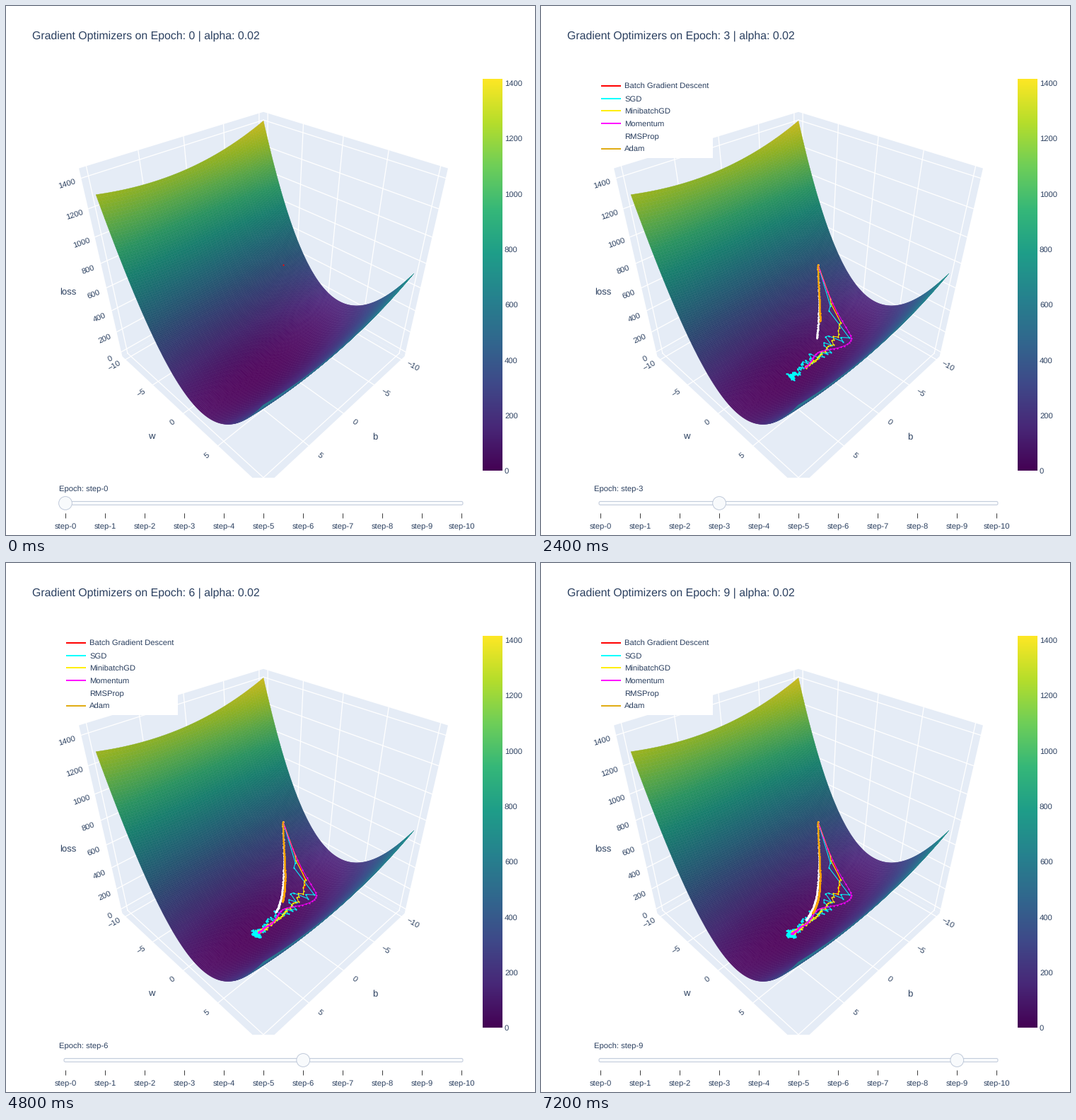
A matplotlib script for the animation above (8000 ms loop, 748 px wide and 748 px high).

```python
import numpy as np
import matplotlib.pyplot as plt
from matplotlib.animation import FuncAnimation
from matplotlib.collections import PolyCollection
from matplotlib.colors import LinearSegmentedColormap
from matplotlib.patches import Circle, FancyBboxPatch, Polygon, Rectangle

SIZE, DPI = 748, 100
PT = 72 / DPI
INK, WALL = "#2a3f5f", "#e5ecf6"
SMALL, LABEL, TITLE = 11.2, 13.1, 15.9
Z_MAX, EPOCHS, ALPHA = 1415, 10, 0.02
W_BEST, B_BEST = 2.02, 3.0
W_START, B_START = -4.0, -7.1
HALF, INSET = 0.5, 0.4694   # half extents of the unit box and of the data
plt.rcParams.update({"font.family": "Liberation Sans", "text.hinting": "none"})

fig = plt.figure(figsize=(SIZE / DPI, SIZE / DPI), dpi=DPI, facecolor="white")
ax = fig.add_axes([0, 0, 1, 1])
ax.axis("off")


def loss(w, b):
    return 8.62 * (w - W_BEST) ** 2 + (b - B_BEST) ** 2


def norm(v):
    return v * INSET / 10


def norm_z(z):
    return (2 * z / Z_MAX - 1) * INSET


def project(x, y, z):
    """Perspective view of the unit box from (1.25, 1.25, 1.25)."""
    x, y, z = np.broadcast_arrays(x, y, z)
    depth = 1.25 * 3 ** 0.5 - (x + y + z) / 3 ** 0.5
    f = 286.8 / np.tan(np.pi / 8) / depth
    return np.stack([364 + f * (y - x) / 2 ** 0.5,
                     380.2 - f * (2 * z - x - y) / 6 ** 0.5], axis=-1)


def on_surface(w, b):
    return project(norm(b), norm(w), norm_z(loss(w, b)))


def text(x, y, s, size=SMALL, **kw):
    return ax.text(x, y, s, fontsize=size * PT, color=INK, **kw)


def tilted(x, y, value, angle):
    text(x, y + 1.2, str(value).replace("-", "\u2212"), rotation=angle,
         ha="center", va="center")


# ---- box, grid and axis labels ----
scene_clip = Rectangle((0, 0), SIZE, 666.5, transform=ax.transData)


def wall(axis):
    """Back face of the box across the given axis."""
    corners = np.full((4, 3), -HALF)
    corners[1:3, (axis + 1) % 3] = HALF
    corners[2:4, (axis + 2) % 3] = HALF
    patch = Polygon(project(*corners.T), color=WALL, lw=0, zorder=1)
    ax.add_patch(patch)
    patch.set_clip_path(scene_clip)


def grid_lines(axis, t):
    """Lines at position t of an axis on the two faces along it."""
    for other in {0, 1, 2} - {axis}:
        ends = np.full((2, 3), -HALF)
        ends[:, axis] = t
        ends[1, other] = HALF
        line, = ax.plot(*project(*ends.T).T, color="white", lw=1.3 * PT, zorder=2)
        line.set_clip_path(scene_clip)


for axis in range(3):
    wall(axis)

for v in range(-10, 11, 5):
    t = norm(v)
    grid_lines(0, t)
    grid_lines(1, t)
    if v < 10:
        x, y = project(HALF, t, -HALF)
        y += 8 + (v + 10) / 3
        tilt = 30 + (v + 10) * 0.6
        tilted(x - 16, y, v, tilt)
        tilted(2 * 364 - x + 16, y, v, -tilt)

for v in range(0, 1401, 200):
    t = norm_z(v)
    grid_lines(2, t)
    k = 1 - v / 1400
    x, y = project(HALF, -HALF, t)
    tilted(x - 20 + 4 * k, y + 7 + 2 * k, v, 17 + 8 * k)
    text(705, 657 - v * 548 / 1400 + 4, str(v))

text(87.5, 408, "loss", LABEL, ha="center")
text(206, 612, "w", LABEL, ha="center")
text(522, 613, "b", LABEL, ha="center")

# ---- surface, painted from back to front ----
viridis = LinearSegmentedColormap.from_list(
    "scale", plt.get_cmap("viridis")(np.linspace(0, 1, 10)), N=1024)
w, b = np.meshgrid(np.linspace(-10, 10, 201), np.linspace(-10, 10, 61),
                   indexing="ij")
P = on_surface(w, b)
quads = np.stack([P[:-1, :-1], P[1:, :-1], P[1:, 1:], P[:-1, 1:]], axis=2)
wc = (w[:-1, :-1] + w[1:, 1:]) / 2
bc = (b[:-1, :-1] + b[1:, 1:]) / 2
ramp = np.clip((wc + 5) / 6, 0, 1)
light = 0.8 + 0.2 * ramp ** 2 * (3 - 2 * ramp)
glow = np.exp(-((wc - 2) / 3) ** 2)[..., None] * np.array([14, 6, 10]) / 255
rgb = viridis(loss(wc, bc) / Z_MAX)[..., :3] * light[..., None] + glow
ax.add_collection(PolyCollection(
    quads.reshape(-1, 4, 2), facecolors=np.clip(rgb, 0, 1).reshape(-1, 3),
    edgecolors="face", linewidths=0.3, zorder=3))

# ---- colour bar ----
ax.imshow(np.linspace(1, 0, 555)[:, None], cmap=viridis, aspect="auto",
          extent=(674, 702, 657, 103), zorder=3)
ax.set_xlim(0, SIZE)
ax.set_ylim(SIZE, 0)

# ---- slider ----
STEP = 56.03
ax.add_patch(FancyBboxPatch((84, 702.5), 560, 1,
                            boxstyle="round,pad=2,rounding_size=2",
                            fc="#f8fafc", ec="#bec8d9", lw=0.95 * PT, zorder=4))
for i in range(11):
    x = 84 + STEP * i
    ax.plot([x, x], [717, 723.5], color="#333333", lw=0.95 * PT,
            solid_capstyle="butt")
    text(x, 739, f"step-{i}", ha="center")
handle = ax.add_patch(Circle((84, 703), 9.4, fc="#f8fafc", ec="#bec8d9",
                             lw=0.95 * PT, zorder=5))
title = text(37, 47, "", TITLE)
caption = text(75, 687, "")

# ---- optimizer trails ----
rng = np.random.default_rng(4)


def descend(per_epoch, batch, beta=0.0):
    """Gradient descent on noisy samples of a line, spread evenly over x."""
    p, v = np.array([W_START, B_START]), np.zeros(2)
    path = [p]
    for k in range(per_epoch * (EPOCHS - 1)):
        n = np.arange(k * batch, (k + 1) * batch)
        x = 10 * ((0.78 + 0.381966 * n) % 1) - 5
        err = (p[0] - W_BEST) * x + p[1] - B_BEST + rng.normal(0, 1.2, batch)
        grad = 2 * np.array([np.mean(err * x), np.mean(err)])
        v = beta * v + (1 - beta) * grad
        p = p - ALPHA * v
        path.append(p)
    return on_surface(*np.transpose(path)), per_epoch


def glide(w_rate, w_power, b_rate, b_power, noise, per_epoch=26):
    """Even, step-limited approach of an adaptive method."""
    e = np.arange(per_epoch * (EPOCHS - 1) + 1) / per_epoch
    w = W_BEST + (W_START - W_BEST) * np.exp(-w_rate * e ** w_power)
    b = B_BEST + (B_START - B_BEST) * np.exp(-b_rate * e ** b_power)
    pts = on_surface(w, b)
    pts[1:] += rng.normal(0, noise, pts[1:].shape)
    return pts, per_epoch


# name, trail colour, legend colour, line width, path
SERIES = [
    ("Batch Gradient Descent", "red", "red", 1.3, descend(1, 50)),
    ("SGD", "cyan", "cyan", 1.0, descend(50, 1)),
    ("MinibatchGD", "yellow", "#ffee00", 1.0, descend(13, 4)),
    ("Momentum", "magenta", "magenta", 0.9, descend(13, 50, beta=0.8)),
    ("RMSProp", "white", "white", 0.9, glide(0.55, 0.8, 0.28, 0.75, 0.4)),
    ("Adam", "orange", "#e0ac14", 1.2, glide(0.26, 1.07, 0.133, 0.95, 0.1)),
]

legend = [ax.add_patch(Rectangle((80, 98), 163, 117, fc="white", lw=0, zorder=7))]
trails = []
for i, (name, color, key, width, path) in enumerate(SERIES):
    line, = ax.plot([], [], color=color, lw=width * PT, marker="o",
                    ms=2.2 * PT, mew=0, zorder=6 + i / 10)
    trails.append(line)
    y = 113 + 17.7 * i
    legend += ax.plot([85, 113], [y, y], color=key, lw=2 * PT, zorder=8,
                      solid_capstyle="butt")
    legend.append(text(118, y + 4, name, zorder=8))


def draw(epoch):
    title.set_text(f"Gradient Optimizers on Epoch: {epoch} | alpha: {ALPHA}")
    caption.set_text(f"Epoch: step-{epoch}")
    handle.set_center((84 + STEP * epoch, 703))
    for item in legend:
        item.set_visible(epoch > 0)
    for i, (line, series) in enumerate(zip(trails, SERIES)):
        pts, per_epoch = series[-1]
        line.set_data(*pts[:epoch * per_epoch + 1].T)
        line.set_visible(epoch > 0 or i == 0)
    return trails


anim = FuncAnimation(fig, draw, frames=EPOCHS, interval=800, repeat=True,
                     repeat_delay=0, blit=False)
plt.show()
```
